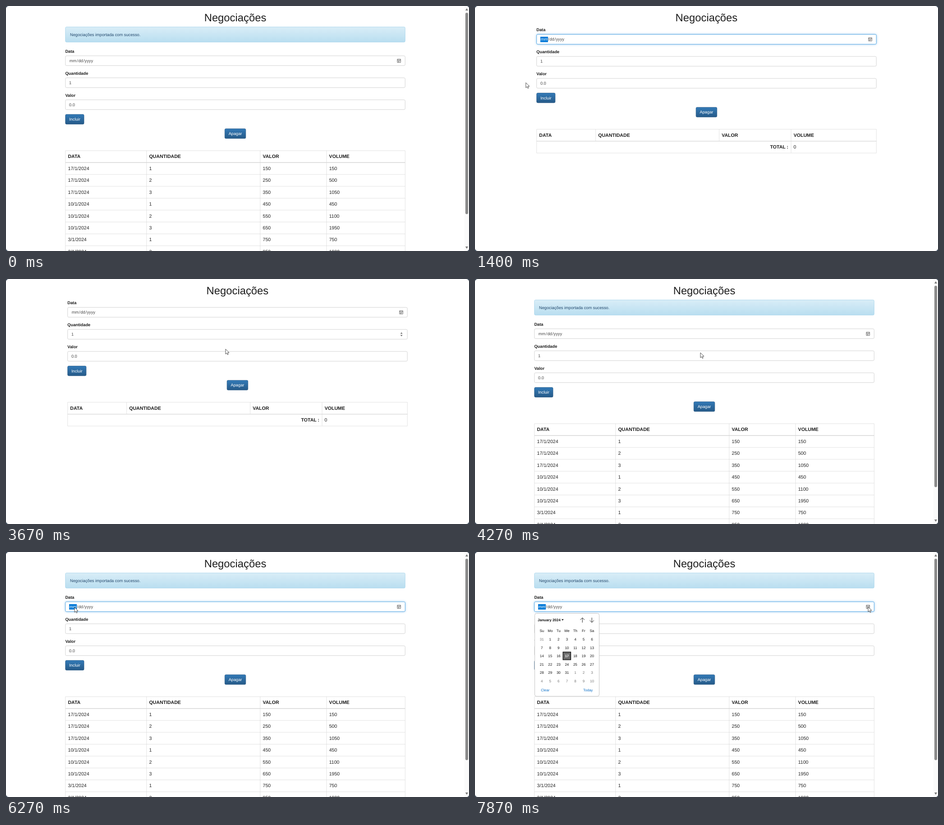
Animation of 1027 by 545 pixels, one loop 8000 ms. Source, as an HTML page:

```html
<!DOCTYPE html>
<html lang="pt">
<head>
<meta charset="utf-8">
<title>Negociações</title>
<style>
html, body { margin: 0; width: 100%; height: 100%; overflow: hidden; background: #2d3c4d; }
svg { display: block; width: 100%; height: 100%; font-family: "Liberation Sans", Arial, sans-serif; }
text { white-space: pre; text-rendering: geometricPrecision; }
.title { font-size: 23.8px; fill: #1c1c1c; text-anchor: middle; }
.label { font-size: 9.26px; font-weight: bold; fill: #1c1c1c; }
.input { font-size: 9.26px; fill: #444; }
.box, .btn, .focus, .alert { stroke-width: .7; }
.box { fill: #fff; stroke: #c0c0c0; }
.btn { fill: url(#blue); stroke: #245580; }
.alert { fill: url(#info); stroke: #9acfea; }
.btn-text { font-size: 9.26px; fill: #fff; text-anchor: middle; }
.cell { font-size: 10.58px; fill: #222; }
.head { font-size: 10.58px; font-weight: bold; fill: #1c1c1c; }
.line { fill: none; stroke: #d6d6d6; stroke-width: .7; }
.thick { stroke: #d6d6d6; stroke-width: 1.32; }
.focus { fill: #fff; stroke: #4aa5e8; stroke-width: .9; filter: drop-shadow(0 0 2.4px rgba(102,175,233,.65)); }
.cal { font-size: 8px; fill: #111; }
.mid { text-anchor: middle; }
</style>
</head>
<body>
<svg viewBox="0 0 1027 545" preserveAspectRatio="none">
  <defs>
    <linearGradient id="blue" x2="0" y2="1"><stop stop-color="#337ab7"/><stop offset="1" stop-color="#265a88"/></linearGradient>
    <linearGradient id="info" x2="0" y2="1"><stop stop-color="#d9edf7"/><stop offset="1" stop-color="#b9def0"/></linearGradient>
  </defs>
  <rect width="1027" height="545" rx="6" fill="#fff"/>
  <text id="title" class="title" y="34.4">Negociações</text>
  <g id="form"></g>
  <g id="empty"></g>
  <g id="full"></g>
  <g id="popup"></g>
  <path id="cursor" d="M0 0V11.2L2.6 8.8 4.3 12.6 6.1 11.8 4.5 8H8Z" fill="#fff" stroke="#222" stroke-width=".8" stroke-linejoin="round"/>
</svg>
<script>
const $ = id => document.getElementById(id);
const text = (x, y, cls, s, extra = '') => `<text x="${x}" y="${y}" class="${cls}" ${extra}>${s}</text>`;
const rect = (x, y, w, h, cls, extra = '') => `<rect x="${x}" y="${y}" width="${w}" height="${h}" class="${cls}" ${extra}/>`;
const path = (d, extra) => `<path d="${d}" ${extra}/>`;
const show = (id, on) => $(id).style.display = on ? '' : 'none';

// Form, laid out for the page with the message above it
const LEFT = 131.8, WIDTH = 753.5, HEIGHT = 21.8;
const FIELD_Y = [0, 1, 2].map(i => 110.8 + i * 48.95);
const bar = (y, cls, extra = '') => rect(LEFT, y, WIDTH, HEIGHT, cls, 'rx="2.5" ' + extra);
const field = (y, name) => text(131.4, y - 7.2, 'label', name) + bar(y, 'box');
const button = (x, y, w, name) =>
  rect(x, y, w, HEIGHT, 'btn', 'rx="2.5"') + text(x + w / 2, y + 14.1, 'btn-text', name);
const spinner = (id, y) =>
  `<g id="${id}">` + path(`M869.8 ${y + 9.7}h5l-2.5-3zM869.8 ${y + 12.3}h5l-2.5 3z`, 'fill="#666"') + '</g>';
const value = (x, i, s, extra) => text(x, FIELD_Y[i] + 14.1, 'input', s, extra);

$('form').innerHTML =
  field(FIELD_Y[0], 'Data') + field(FIELD_Y[1], 'Quantidade') + field(FIELD_Y[2], 'Valor') +
  bar(FIELD_Y[0], 'focus', 'id="focus"') +
  rect(140, 116, 17, 12, '', 'fill="#0078d7" id="mark"') +
  value(140.8, 0, 'mm', 'id="month"') + value(157.2, 0, '/') +
  value(160.4, 0, 'dd') + value(171.5, 0, '/') + value(174.6, 0, 'yyyy') +
  path('M868 118.2h7.4v7.2h-7.4zM868 120.4h7.4M869.7 122.4h4M869.7 124h2.5', 'fill="none" stroke="#333" stroke-width=".75"') +
  value(140, 1, '1') + value(140, 2, '0.0') +
  spinner('spin1', FIELD_Y[1]) + spinner('spin2', FIELD_Y[2]) +
  button(LEFT, 241.1, 41.2, 'Incluir') + button(485.3, 272.9, 46.5, 'Apagar');

// Tables
const ROW = 26.45;
const HEADS = ['DATA', 'QUANTIDADE', 'VALOR', 'VOLUME'];
const header = (xs, y) =>
  HEADS.map((s, i) => text(xs[i] + 5.6, y + 16.5, 'head', s)).join('') +
  path(`M${xs[0]} ${y}H${xs[4]}`, 'class="line"') +
  path(`M${xs[0]} ${y + ROW}H${xs[4]}`, 'class="thick"');

const eX = [136.7, 267.6, 541.6, 701.1, 890.3], eY = 274.2;
$('empty').innerHTML = header(eX, eY) +
  path(eX.map((x, i) => `M${x} ${eY}v${ROW * (i === 1 || i === 2 ? 1 : 2)}`).join('') +
    `M${eX[0]} ${eY + 2 * ROW}H${eX[4]}`, 'class="line"') +
  text(695, eY + ROW + 16.5, 'head', 'TOTAL :', 'text-anchor="end"') + text(706.6, eY + ROW + 16.5, 'cell', '0');

const fX = [131.8, 311.8, 563.8, 711, 885.4], fY = 321.8;
let rows = '';
for (let i = 0; i < 8; i++) {
  const y = fY + (i + 1) * ROW, qty = i % 3 + 1;
  const price = 150 + 100 * i + (i > 6 ? 100 : 0);
  const day = 17 - 7 * Math.floor(i / 3);
  [`${day}/1/2024`, qty, price, qty * price].forEach((s, c) => rows += text(fX[c] + 5.7, y + 16.5, 'cell', s));
  rows += path(`M${fX[0]} ${y + ROW}H${fX[4]}`, 'class="line"');
}
$('full').innerHTML =
  rect(LEFT, 46.6, WIDTH, 33.7, 'alert', 'rx="2.5"') +
  text(142, 66.8, 'input', 'Negociações importada com sucesso.', 'style="fill:#23486c"') +
  header(fX, fY) + path(fX.map(x => `M${x} ${fY}V545`).join(''), 'class="line"') + rows +
  path('M1017 0H1021Q1027 0 1027 6V539Q1027 545 1021 545H1017Z', 'fill="#fafafa"') +
  rect(1019, 15, 6, 448, '', 'rx="3" fill="#8a8a8a"') +
  path('M1019 10h6l-3-5zM1019 535h6l-3 5z', 'fill="#777"');

// Date picker
let days = '';
const colX = c => 148.3 + 18.52 * c;
['Su', 'Mo', 'Tu', 'We', 'Th', 'Fr', 'Sa'].forEach((s, c) => days += text(colX(c), 178, 'cal mid', s));
for (let i = 0; i < 42; i++) {
  const n = i === 0 ? 31 : (i - 1) % 31 + 1;
  const style = i === 17 ? 'style="fill:#fff;font-weight:bold"' : i === 0 || i > 31 ? 'style="fill:#767676"' : '';
  days += text(colX(i % 7), 197 + 18.52 * Math.floor(i / 7), 'cal mid', n, style);
}
$('popup').innerHTML =
  rect(132.5, 136.5, 143, 184.5, '', 'rx="4" fill="#fff" stroke="#c4c4c4"') +
  rect(195.2, 222.5, 17.2, 17.2, '', 'fill="#6b6b6b" stroke="#111" stroke-width="1.4"') +
  text(139, 153.6, 'cal', 'January 2024', 'font-weight="bold"') +
  path('M191.8 149.6h5l-2.5 2.8z', 'fill="#111"') +
  path('M238.2 157V146.5M233.5 151l4.7-4.7 4.7 4.7M259.2 146V156.5M254.5 152l4.7 4.7 4.7-4.7', 'fill="none" stroke="#222"') +
  days + text(146.3, 310, 'cal', 'Clear', 'style="fill:#0b6fc7"') + text(240, 310, 'cal', 'Today', 'style="fill:#0b6fc7"');

// Pointer route: time, x, y
const ROUTE = [
  [1067, 65, 41], [1200, 148, 72], [1267, 146, 76], [1400, 112.8, 170.6], [1600, 112, 176], [1867, 115, 184],
  [2667, 115, 184], [2733, 114.8, 188.6], [2933, 180, 232], [3133, 300, 243], [3333, 430, 205], [3533, 482, 160],
  [3600, 488, 130], [3667, 487, 156], [4200, 498, 157], [4267, 500, 164], [4400, 500, 164],
  [4667, 470, 102], [4933, 330, 221], [5267, 217, 165], [5333, 215, 168], [5600, 200, 219], [5867, 160, 150],
  [6133, 150, 121], [6200, 152, 123], [6267, 152, 123], [6467, 300, 160], [6600, 480, 169], [6800, 800, 140],
  [6933, 925, 119], [7067, 925, 119], [7400, 893, 118], [7667, 872, 122], [8000, 872, 122]
];
function pointer(t) {
  if (t < 1060) return null;
  const i = Math.max(1, ROUTE.findIndex(p => p[0] >= t));
  const [a, b] = [ROUTE[i - 1], ROUTE[i]];
  const k = Math.max(0, (t - a[0]) / (b[0] - a[0]));
  return [a[1] + (b[1] - a[1]) * k, a[2] + (b[2] - a[2]) * k];
}

const STEP = 1000 / 15, LOOP = 8000;
const ramp = (t, start) => Math.min(1, Math.max(0, (t - start) / 140));

function draw(now) {
  const t = Math.floor((now % LOOP + 5) / STEP) * STEP;
  const full = t < 730 || t > 4195;
  const dx = full ? 0 : 4.9, dy = full ? 0 : -47.6;
  $('title').setAttribute('x', 508.5 + dx);
  $('form').setAttribute('transform', `translate(${dx} ${dy})`);
  show('full', full);
  show('empty', !full);
  show('popup', t > 7860);

  const marked = t > 1195 && t < 1595 || t > 6130;
  $('focus').style.opacity = t < 4000 ? ramp(t, 1200) - ramp(t, 1600) : ramp(t, 6133);
  show('mark', marked);
  $('month').style.fill = marked ? '#fff' : '';

  const tip = pointer(t);
  show('cursor', tip);
  if (tip) $('cursor').setAttribute('transform', `translate(${tip})`);

  // Hover shows one step late
  const last = pointer(t - STEP);
  [1, 2].forEach(n => {
    const x = LEFT + dx, y = FIELD_Y[n] + dy;
    show('spin' + n, last && last[0] > x && last[0] < x + WIDTH && last[1] > y && last[1] < y + HEIGHT);
  });
}

const start = performance.now();
function tick() {
  draw(performance.now() - start);
  requestAnimationFrame(tick);
}
tick();
</script>
</body>
</html>
```
